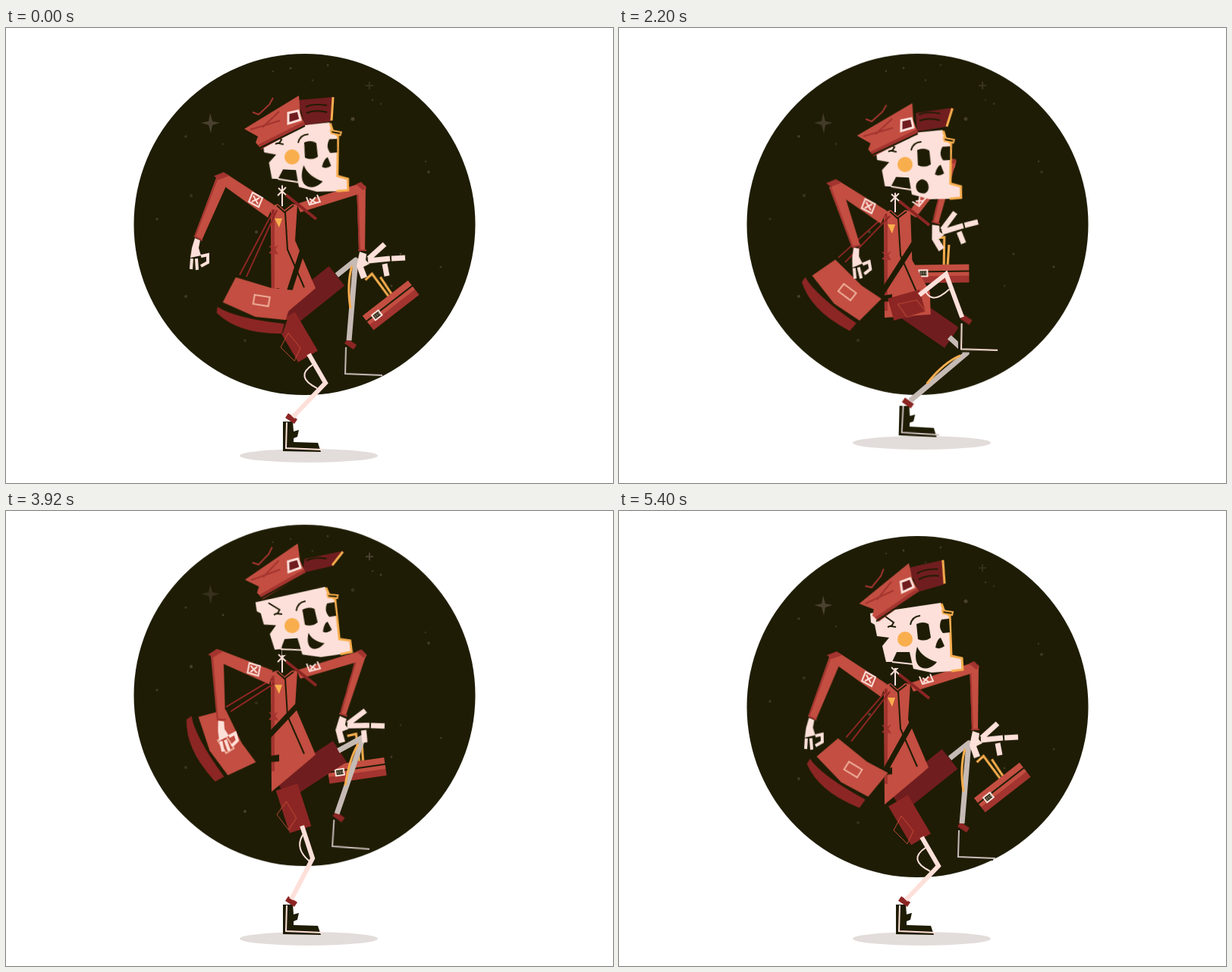
An HTML page without scripts for the animation above (5440 ms loop, 800 by 600 pixels).

```html
<!DOCTYPE html>
<html lang="en">
<head>
<meta charset="utf-8">
<title>Skeleton postman</title>
<style>
html, body { margin: 0; width: 100%; height: 100%; overflow: hidden; background: #fff; }
svg { display: block; width: 800px; height: 600px; }
:root { --ink: #1e1c04; --red: #c34e41; --mid: #a3342f; --dark: #8c2624; --deep: #701d1f; --bone: #fde0d9; --gold: #f9ae4e; --grey: #c6bab5; }
path, line { fill: none; }
.ink { fill: var(--ink); } .red { fill: var(--red); } .mid { fill: var(--mid); }
.dark { fill: var(--dark); } .deep { fill: var(--deep); } .bone { fill: var(--bone); } .gold { fill: var(--gold); }
.li { stroke: var(--ink); stroke-width: 2; } .lb { stroke: var(--bone); stroke-width: 2; }
.lg { stroke: var(--gold); stroke-width: 3; } .lr { stroke: var(--mid); stroke-width: 2; }

/* one step lasts 680 ms, a left-right pair 1360 ms */
.sky, .body, .head, .hat, .visor, .rim, .strap, .belt, .bag { animation: 680ms linear infinite; }
.ground, .box, .coat, .pocket, .np, .nb, .nc, .fp, .fb, .fc, .nboot, .fboot,
.ru, .rf, .rh, .lu, .lf, .lh, .eye, .mouth { animation: 1360ms linear infinite; }

.sky { animation-name: sky; }
@keyframes sky {
  0%, 23.53%, 100% { transform: translateY(0); }
  41% { transform: translateY(-16px); animation-timing-function: ease-out; }
  58.8% { transform: translateY(-24px); animation-timing-function: ease-in; }
  76.47% { transform: translateY(-16px); }
  94.12% { transform: translateY(-1px); }
}
.body { animation-name: body; }
@keyframes body {
  0%, 100% { transform: translateY(0); }
  17.65% { transform: translateY(3px); }
  23.53%, 32% { transform: translateY(8px); }
  50% { transform: translateY(-13px); }
  65% { transform: translateY(-26px); }
  76.47% { transform: translateY(-22px); }
  94.12% { transform: translateY(-5px); }
}
.head { animation-name: head; transform-origin: 377px 169px; }
@keyframes head {
  0%, 100% { transform: translateY(1px) rotate(3deg); }
  17.65% { transform: translateY(6px) rotate(3deg); }
  23.53%, 32% { transform: translateY(11px) rotate(3deg); }
  50% { transform: translateY(-9px) rotate(-1deg); }
  65% { transform: translateY(-21px) rotate(-4deg); }
  76.47% { transform: translateY(-18px) rotate(-4deg); }
  94.12% { transform: none; }
}
.hat { animation-name: hat; transform-origin: 379px 118px; }
@keyframes hat {
  0%, 100% { transform: translateY(0) rotate(0deg); }
  17.65% { transform: translateY(6px) rotate(0deg); }
  23.53%, 32% { transform: translateY(10px) rotate(1deg); }
  50% { transform: translateY(-18px) rotate(0deg); }
  66% { transform: translateY(-48px) rotate(-2deg); }
  76.47% { transform: translateY(-46px) rotate(-3deg); }
  94.12% { transform: translateY(-20px) rotate(-8deg); }
}
.visor { animation-name: visor; }
@keyframes visor {
  0%, 94.12%, 100% { d: path("M385 95L431 91L429 123L394 128Z"); }
  17.65%, 32% { d: path("M391 102L440 94L433 119L393 126Z"); }
  76.47% { d: path("M394 110L446 102L430 121L390 128Z"); }
}
.rim { animation-name: rim; }
@keyframes rim {
  0%, 94.12%, 100% { d: path("M431 91L429 122"); }
  17.65%, 32% { d: path("M439 95L432 119"); }
  76.47% { d: path("M445 103L430 120"); }
}
.strap { animation-name: strap; }
@keyframes strap {
  0%, 100% { d: path("M353 240L308 326M357 240L317 328"); }
  17.65% { d: path("M352 240L290 299M357 244L299 306"); }
  23.53% { d: path("M353 245L289 303M357 248L298 309"); }
  76.47% { d: path("M352 221L290 258M354 227L296 264"); }
  94.12% { d: path("M353 236L299 298M357 238L306 303"); }
}
.belt { animation-name: belt; }
@keyframes belt {
  0%, 100% { d: path("M404 252L374 346"); }
  17.65% { d: path("M404 256L342 354"); }
  23.53% { d: path("M404 260L340 360"); }
  76.47% { d: path("M406 233L326 318"); }
  94.12% { d: path("M404 247L346 350"); }
}
.bag { animation-name: bag; }
@keyframes bag {
  0%, 100% { transform: translate(337px,359px) rotate(0deg); }
  17.65% { transform: translate(301px,343px) rotate(27deg); }
  23.53% { transform: translate(301px,348px) rotate(28deg); }
  55% { transform: translate(293px,318px) rotate(42deg); }
  76.47% { transform: translate(290px,307px) rotate(48deg); }
  94.12% { transform: translate(308px,340px) rotate(23deg); }
}

.ground { animation-name: ground; }
@keyframes ground {
  0%, 14%, 85%, 100% { transform: translateY(0); }
  36%, 64% { transform: translateY(-17px); }
}
.box { animation-name: box; }
@keyframes box {
  0%, 100% { transform: translate(508px,365px) rotate(-38deg); }
  8.82% { transform: translate(503px,375px) rotate(-20deg); }
  11.76% { transform: translate(499px,374px) rotate(-13deg); }
  38.24% { transform: translate(468px,346px) rotate(-9deg); }
  58.82% { transform: translate(420px,322px) rotate(0deg); }
  88.24% { transform: translate(463px,342px) rotate(-8deg); }
  97.06% { transform: translate(506px,364px) rotate(-38deg); }
}
.coat { animation-name: coat; }
@keyframes coat {
  0%, 11.76%, 88.24%, 100% { d: path("M349 235L358 232L367 240L377 232L384 233L381 280L408 343L400 350L350 392Z"); }
  38.24%, 58.82% { d: path("M349 235L358 232L367 240L377 232L384 233L387 300L410 340L412 372L350 372Z"); }
}
.pocket { animation-name: pocket; }
@keyframes pocket {
  0%, 97.06%, 100% { transform: translate(375px,420px); }
  8.82%, 11.76% { transform: translate(377px,426px); }
  25% { transform: translate(384px,387px) rotate(-35deg); }
  38.24% { transform: translate(385px,346px) rotate(-72deg); }
  58.82% { transform: translate(385px,369px) rotate(-70deg); }
  75% { transform: translate(384px,372px) rotate(-35deg); }
  88.24% { transform: translate(370px,401px) rotate(8deg); }
}

/* near leg: trousers, bone, calf string */
.np { animation-name: np; stroke: var(--dark); stroke-width: 30; }
@keyframes np {
  0%, 97.06%, 100% { d: path("M368 382L398 433"); }
  8.82% { d: path("M366 387L401 438"); }
  11.76% { d: path("M367 391L402 441"); }
  25% { d: path("M364 374L404 402"); }
  38.24% { d: path("M357 349L401 331"); }
  58.82% { d: path("M357 372L399 353"); }
  75% { d: path("M364 368L404 388"); }
  88.24% { d: path("M370 364L388 420"); }
}
.nb { animation-name: nb; stroke: var(--bone); stroke-width: 6; }
@keyframes nb {
  0%, 97.06%, 100% { d: path("M399 430L421 468L378 513"); }
  8.82% { d: path("M402 435L425 472L378 513"); }
  11.76% { d: path("M404 438L428 475L378 513"); }
  25% { d: path("M404 402L436 400L408 456"); }
  38.24% { d: path("M397 321L438 294L441 357"); }
  58.82% { d: path("M394 344L429 315L457 369"); }
  75% { d: path("M404 388L440 366L431 436"); }
  88.24% { d: path("M390 415L404 458L376 512"); }
}
.nc { animation-name: nc; }
@keyframes nc {
  0%, 97.06%, 100% { d: path("M404 444Q380 460 410 475"); }
  8.82%, 11.76% { d: path("M406 450Q376 468 413 482"); }
  25% { d: path("M408 405Q405 425 428 415"); }
  38.24% { d: path("M411 318Q424 341 438 314"); }
  58.82% { d: path("M402 337Q412 357 435 334"); }
  75% { d: path("M411 386Q412 405 436 390"); }
  88.24% { d: path("M391 427Q380 445 400 462"); }
}
.nboot { animation-name: nboot; }
@keyframes nboot {
  0%, 11.76%, 88.24%, 100% { transform: translate(369px,554px); }
  25% { transform: translate(400px,498px) rotate(8deg); }
  38.24% { transform: translate(440px,402px); }
  58.82% { transform: translate(457px,411px); }
  75% { transform: translate(425px,478px) rotate(-4deg); }
}

/* far leg */
.fp { animation-name: fp; stroke: var(--deep); stroke-width: 33; }
@keyframes fp {
  0%, 97.06%, 100% { d: path("M366 383L436 327"); }
  8.82% { d: path("M366 395L427 326"); }
  11.76% { d: path("M366 398L428 323"); }
  25% { d: path("M372 374L425 355"); }
  38.24% { d: path("M384 344L423 396"); }
  58.82% { d: path("M376 365L440 414"); }
  75% { d: path("M374 366L432 384"); }
  88.24% { d: path("M363 367L440 317"); }
}
.fb { animation-name: fb; stroke: var(--grey); stroke-width: 7; }
@keyframes fb {
  0%, 97.06%, 100% { d: path("M436 326L461 306L452 412"); }
  8.82% { d: path("M424 326L448 295L459 402"); }
  11.76% { d: path("M424 322L444 295L461 402"); }
  25% { d: path("M425 355L458 348L427 458"); }
  38.24% { d: path("M421 394L436 418L377 499"); }
  58.82% { d: path("M436 413L459 437L378 501"); }
  75% { d: path("M432 384L455 392L409 450"); }
  88.24% { d: path("M438 316L471 298L436 399"); }
}
.fc { animation-name: fc; }
@keyframes fc {
  0%, 97.06%, 100% { d: path("M456 314Q449 338 454 370"); }
  8.82%, 11.76% { d: path("M442 306Q444 330 454 355"); }
  25% { d: path("M453 354Q440 380 440 408"); }
  38.24% { d: path("M431 424Q408 442 393 475"); }
  58.82% { d: path("M450 440Q428 449 402 478"); }
  75% { d: path("M450 397Q430 405 422 430"); }
  88.24% { d: path("M464 308Q453 325 447 362"); }
}
.fboot { animation-name: fboot; }
@keyframes fboot {
  0%, 97.06%, 100% { transform: translate(447px,456px); }
  8.82% { transform: translate(457px,445px) rotate(5deg); }
  11.76% { transform: translate(461px,445px) rotate(3deg); }
  25% { transform: translate(419px,500px); }
  38.24%, 58.82% { transform: translate(366px,543px); }
  75% { transform: translate(402px,491px) rotate(8deg); }
  88.24% { transform: translate(430px,442px) rotate(2deg); }
}

/* right arm, then left arm: upper, lower, hand */
.ru { animation-name: ru; transform-origin: 388px 237px; }
@keyframes ru {
  0%, 11.76%, 97.06%, 100% { transform: rotate(0deg); }
  38.24%, 88.24% { transform: rotate(1deg); }
  58.82% { transform: rotate(-39deg); }
}
.rf { animation-name: rf; transform-origin: 469px 210px; }
@keyframes rf {
  0%, 97.06%, 100% { transform: rotate(0deg); }
  8.82%, 11.76% { transform: rotate(-6deg); }
  38.24% { transform: rotate(15deg); }
  58.82% { transform: rotate(54deg); }
  88.24% { transform: rotate(17deg); }
}
.rh { animation-name: rh; transform-origin: 470px 297px; }
@keyframes rh {
  0%, 97.06%, 100% { transform: rotate(0deg); }
  8.82%, 11.76% { transform: rotate(9deg); }
  38.24%, 88.24% { transform: rotate(-13deg); }
  58.82% { transform: rotate(-28deg); }
}
.lu { animation-name: lu; transform-origin: 348px 240px; }
@keyframes lu {
  0%, 11.76%, 58.82%, 97.06%, 100% { transform: rotate(0deg); }
  38.24%, 88.24% { transform: rotate(-12deg); }
}
.lf { animation-name: lf; transform-origin: 285px 198px; }
@keyframes lf {
  0%, 100% { transform: rotate(0deg); }
  8.82% { transform: rotate(4deg); }
  11.76% { transform: rotate(5deg); }
  38.24% { transform: rotate(-11deg); }
  58.82% { transform: rotate(-43deg); }
  88.24% { transform: rotate(-14deg); }
  97.06% { transform: rotate(-1deg); }
}
.lh { animation-name: lh; transform-origin: 251px 278px; }
@keyframes lh {
  0%, 11.76%, 97.06%, 100% { transform: rotate(0deg); }
  38.24%, 88.24% { transform: rotate(10deg); }
  58.82% { transform: rotate(34deg); }
}

.eye { animation-name: blink; transform-box: fill-box; transform-origin: center; }
@keyframes blink {
  0%, 5%, 20%, 100% { transform: scaleY(1); }
  8.82% { transform: scaleY(.6); }
  11.76%, 14.7% { transform: scaleY(.13); }
}
.mouth { animation-name: mouth; }
@keyframes mouth {
  0%, 14%, 97.06%, 100% { d: path("M393 179C397 189 408 196 419 199C409 213 384 212 393 179Z"); }
  38.24% { d: path("M404 189C411 189 411 199 404 199C397 199 397 189 404 189Z"); }
  58.82% { d: path("M401 188C413 188 413 207 401 207C389 207 389 188 401 188Z"); }
  88.24% { d: path("M398 180C401 188 409 193 418 195C408 206 391 205 398 180Z"); }
}
.star { fill: #4a4130; animation: twinkle 2720ms ease-in-out infinite; }
.b { animation-delay: -700ms; } .c { animation-delay: -1400ms; } .d { animation-delay: -2100ms; }
@keyframes twinkle { 0%, 100% { opacity: 1; } 50% { opacity: .55; } }
</style>
</head>
<body>
<svg viewBox="0 0 800 600">
  <defs>
    <g id="boot">
      <path class="ink" d="M-4-35L9-35L10-22L17-24L15-15L10-13L10-8L42-7L46 5L-4 4Z"/>
      <path class="dark" d="M3-46L15-38L11-32L-1-40Z"/>
    </g>
  </defs>

  <g class="sky">
    <circle class="ink" cx="393.5" cy="259" r="225"/>
    <path class="star" d="M269 112L272 123L282 125L272 128L270 139L267 128L257 125L267 123Z"/>
    <path class="star c" d="M478 71H480V75H484V77H480V81H478V77H474V75H478Z"/>
    <g class="star">
      <circle cx="375" cy="53" r="1.5"/><circle cx="457" cy="120" r="2.5"/>
      <circle cx="330" cy="269" r="2"/><circle cx="520" cy="298" r="1.5"/>
    </g>
    <g class="star b">
      <circle cx="352" cy="57" r="1.2"/><circle cx="237" cy="143" r="1.8"/><circle cx="553" cy="176" r="1.2"/>
      <circle cx="237" cy="354" r="2"/><circle cx="573" cy="315" r="1.6"/>
    </g>
    <g class="star c">
      <circle cx="404" cy="69" r="1.5"/><circle cx="244" cy="221" r="2.2"/><circle cx="494" cy="100" r="1.5"/>
      <circle cx="315" cy="412" r="2"/><circle cx="286" cy="153" r="1.5"/>
    </g>
    <g class="star d">
      <circle cx="424" cy="49" r="1.5"/><circle cx="199" cy="252" r="1.8"/><circle cx="557" cy="190" r="2"/>
      <circle cx="483" cy="95" r="1.3"/><circle cx="508" cy="340" r="1.5"/>
    </g>
  </g>
  <ellipse class="ground" cx="399" cy="564" rx="91" ry="9" fill="#e2dcda"/>

  <g class="box">
    <path class="lg" d="M-7-47L5-48L4-12M11-38L9-12"/>
    <path class="red" d="M-39-12L37-12L37 12L-39 12Z"/>
    <path class="mid" d="M-39 3L37 3L37 12L-39 12Z"/>
    <path class="li" d="M-39-3H37"/>
    <path class="ink lb" d="M-29-5H-18V3H-29Z"/>
    <path stroke="var(--grey)" d="M-26-3V1M-23-3V1M-20-3V1"/>
  </g>

  <g class="fboot"><use href="#boot"/><path stroke="#c9bcba" stroke-width="2" d="M1-35L0 0L49 2"/></g>
  <path class="fp"/>
  <path class="fb" stroke-linejoin="round"/>
  <path class="fc lg"/>

  <g class="body">
    <g class="ru">
      <g class="rf">
        <g class="rh">
          <path class="bone" d="M466 295L475 298L474 306L479 311L471 315L476 328L468 331L462 314Z"/>
          <path stroke="var(--bone)" stroke-width="7" d="M478 304L499 285M477 307L506 304M508 304L526 303M499 311L502 327"/>
        </g>
        <path class="red" d="M462 207L474 208L473 294L465 294Z"/>
        <path class="lr" d="M463 208L466 294M464 293H475"/>
      </g>
      <path class="red" d="M383 232L466 205L475 211L468 218L388 243Z"/>
      <path class="mid" d="M461 206L468 203L475 210L471 214Z"/>
      <path class="lb" d="M396 223L400 233L414 229L410 220M400 225L408 230M408 223L401 231"/>
    </g>
    <path class="coat red"/>
    <path stroke="var(--mid)" stroke-width="4" d="M352 239V365"/>
    <path class="mid" d="M346 287L354 289L359 286L355 292L359 298L346 297L351 292Z"/>
    <path class="li" d="M357 234L367 243L379 234M368 243L371 292L393 342"/>
    <path class="gold" d="M354 251L364 251L360 263Z"/>
    <path class="ink" d="M347 345L360 343L360 352L348 353Z"/>
    <path stroke="var(--dark)" stroke-width="4" d="M369 220L409 252"/>
  </g>

  <g class="nboot"><use href="#boot"/><path class="lb" d="M1-34L0 0L48 2"/></g>
  <path class="np"/>
  <path class="nc lb"/>
  <path class="nb"/>
  <path class="pocket" stroke="#c14b35" d="M-3-18L13 2L5 19L-13 1Z"/>

  <path class="strap" stroke="var(--dark)" stroke-width="2"/>
  <path class="belt" stroke="var(--ink)" stroke-width="7"/>
  <g class="bag">
    <path class="ink" d="M-51 3L-59 12Q-40 40 28 44L34 26Z"/>
    <path class="dark" d="M-58 9Q-35 24 30 31L27 44Q-30 45-59 17Z"/>
    <path class="red" d="M-34-30L13-16L44-13L32 26L-8 22L-51 3Z"/>
    <path stroke="#efb09c" stroke-width="2" d="M-9-7L11-4L9 8L-11 5Z"/>
  </g>

  <g class="body">
    <g class="lu">
      <g class="lf">
        <g class="lh">
          <path class="bone" d="M249 277L256 280L254 290L257 300L243 303L245 290Z"/>
          <path stroke="var(--bone)" stroke-width="4" d="M245 304L244 318M251 304L252 319M257 301L266 299L266 309L257 314"/>
        </g>
        <path class="red" d="M278 195L292 204L258 280L248 275Z"/>
        <path class="lr" d="M279 197L249 275L259 280"/>
      </g>
      <path class="red" d="M279 196L290 192L353 233L345 250L287 208Z"/>
      <path class="mid" d="M274 195L287 190L294 195L280 200Z"/>
      <path class="lb" d="M325 217L338 224L333 236L320 229ZM326 221L332 232M334 224L324 229"/>
    </g>
    <path class="lb" d="M364 198V235M359 211L369 220M369 210L358 221"/>
  </g>

  <g class="head">
    <path class="ink" d="M362 183H386V207H361Z"/>
    <path class="bone" d="M331 135L424 121L428 132L437 136V165L438 191L452 193L453 210L412 213L388 208L383 186L366 186L360 199L352 199L347 178L356 167L340 165L337 150L332 147Z"/>
    <path class="lb" d="M360 199L388 202"/>
    <path class="lg" d="M425 122L429 133L436 138L438 191L452 194L453 209L438 211"/>
    <path class="li" d="M348 137L362 147L359 152L365 153M354 153L360 151M384 150Q386 139 397 138"/>
    <path class="lg" style="fill:var(--ink);stroke-width:2" d="M426 131L440 133L439 137L427 135Z"/>
    <circle class="gold" cx="377" cy="169" r="10"/>
    <path class="eye ink" d="M392 149Q401 145 408 149L411 167Q403 173 394 169Z"/>
    <path class="eye ink" d="M425 143L435 142L436 160L427 161Q420 153 425 143Z"/>
    <path class="ink" d="M417 180Q419 169 424 167L429 178Q423 183 417 180Z"/>
    <path class="mouth ink"/>
  </g>

  <g class="hat">
    <path class="lr" d="M325 111L333 114L347 101L352 92"/>
    <path class="visor deep"/>
    <path class="li" d="M395 104Q405 99 423 102M396 112Q408 107 423 111"/>
    <path class="rim lg"/>
    <path class="red" d="M314 133L386 89L388 112L394 128L336 159L329 151L332 143Z"/>
    <path class="mid" d="M332 154L393 123L394 129L336 160Z"/>
    <path class="lr" d="M322 134L361 122M338 131L360 110"/>
    <path class="li" d="M333 159L394 129"/>
    <path class="deep" stroke="var(--bone)" stroke-width="3" d="M372 112L385 109L388 121L372 126Z"/>
  </g>
</svg>
</body>
</html>
```
